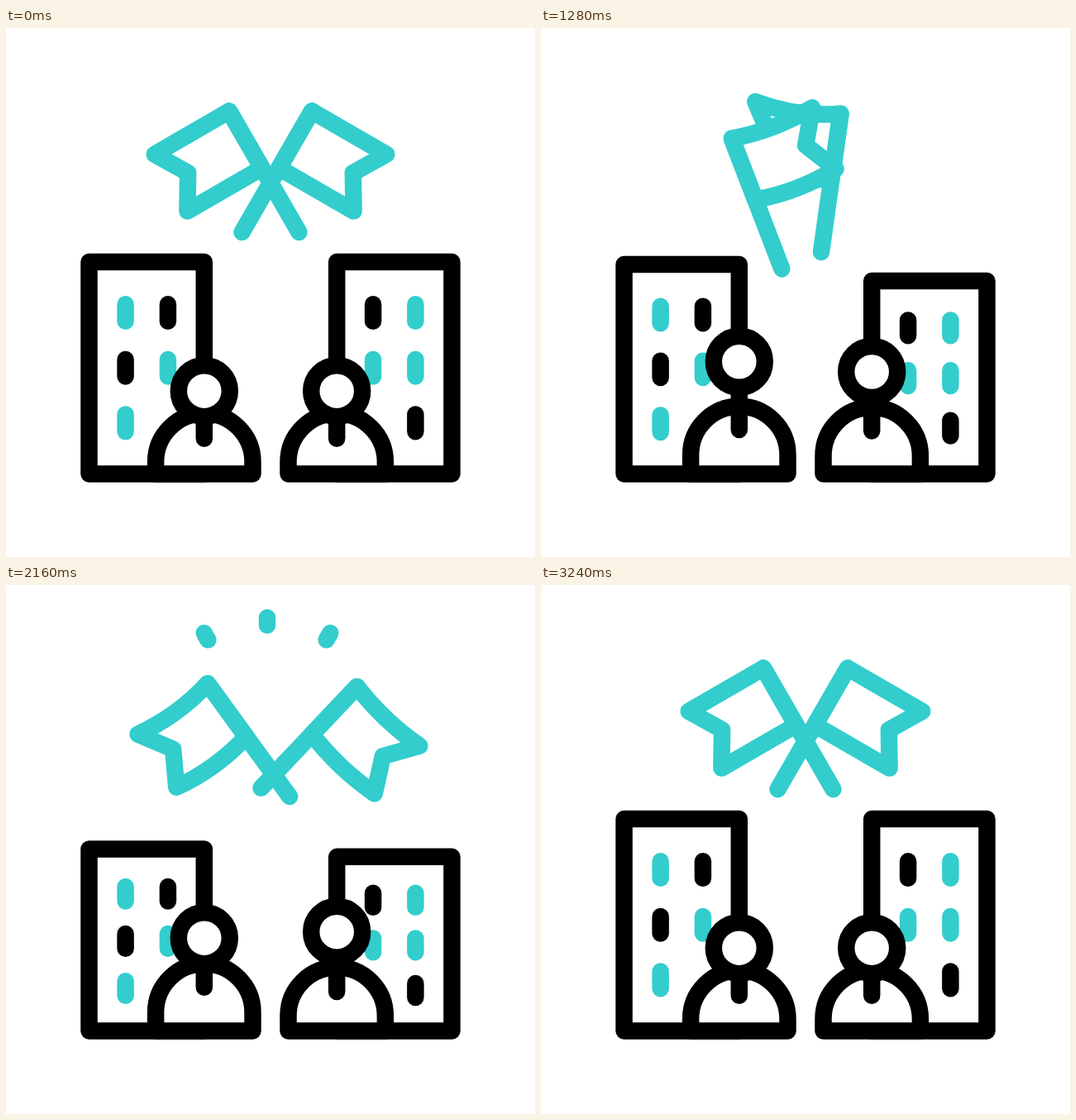
Animation, 640 px wide and 640 px high, one loop 3600 ms. Source, as an HTML page with a canvas:

```html
<!DOCTYPE html>
<html lang="en">
<head>
<meta charset="utf-8">
<title>Two sides</title>
<style>
  html, body { margin: 0; width: 100%; height: 100%; overflow: hidden; background: #fff; }
  canvas { display: block; width: 100vw; height: 100vh; }
</style>
</head>
<body>
<canvas id="stage" width="640" height="640"></canvas>
<script>
const ctx = document.getElementById('stage').getContext('2d');
const TEAL = '#33cdcd', BLACK = '#000', WHITE = '#fff';
const LOOP = 3600, STEP = 20, LAG = 200;
const PANE = 10.3, POLE = 169, CLOTH = 79.4;

const clamp = (v, a, b) => Math.min(b, Math.max(a, v));
const progress = (t, from, to) => clamp((t - from) / (to - from), 0, 1);

// eased path through [time, value] turning points, at rest where it turns
function track(...keys) {
  const last = keys.length - 1;
  const slope = k => {
    if (k === 0 || k === last) return 0;
    const [[t0, v0], [, v], [t1, v1]] = keys.slice(k - 1, k + 2);
    return (v - v0) * (v1 - v) > 0 ? (v1 - v0) / (t1 - t0) : 0;
  };
  return t => {
    let i = 0;
    while (i < last - 1 && t >= keys[i + 1][0]) i++;
    const [t0, a] = keys[i], [t1, b] = keys[i + 1];
    const u = progress(t, t0, t1), w = 1 - u;
    return a + (b - a) * u * u * (3 - 2 * u) +
      (t1 - t0) * u * w * (slope(i) * w - slope(i + 1) * u);
  };
}

const lean = track([0, 30], [860, -26], [1280, -8], [1440, 23], [1900, 44], [2620, 17], [3040, 30]);
const footX = track([840, 354.5], [1280, 339], [1580, 318], [2500, 354.5], [3040, 353.5]);
const footY = track([0, 247], [760, 310], [1280, 271], [1560, 230], [2340, 260], [3040, 247]);
const bulge = track([0, 0], [760, 11], [1190, -8], [1620, 9], [2060, -6], [2680, 6], [3040, 0]);
const headShift = track([200, 0], [540, 13], [1240, -34], [1540, -34.5], [2250, -11], [2500, -18], [2780, 0]);
const bodyShift = track([200, 0], [520, 12], [1200, -11], [1880, -3.5], [2180, -10], [2580, 0]);

function line(x1, y1, x2, y2, color) {
  ctx.strokeStyle = color;
  ctx.beginPath();
  ctx.moveTo(x1, y1);
  ctx.lineTo(x2, y2);
  ctx.stroke();
}

function outline(color) {
  ctx.fillStyle = WHITE;
  ctx.strokeStyle = color;
  ctx.fill();
  ctx.stroke();
}

function building(t, mirrored) {
  const turns = 2 * progress(t, 180, 2580);
  const drop = 23 * (1 - Math.cos(turns * 2 * Math.PI));
  ctx.beginPath();
  ctx.rect(100.5, 283 + drop, 139.3, 256.5 - drop);
  outline(BLACK);

  const sink = y => y + drop * 0.00393 * (548 - y);
  const pane = (col, row, color) => {
    const x = 144.6 + 51.3 * col, y = 344.5 + 66.7 * row;
    line(x, sink(y - PANE), x, sink(y + PANE), color);
  };
  pane(0, 0, TEAL);
  pane(0, 1, mirrored ? TEAL : BLACK);
  pane(0, 2, mirrored ? BLACK : TEAL);
  pane(1, 0, BLACK);
  pane(1, 1, TEAL);
}

function person(t) {
  const body = bodyShift(t);
  const x = 239.8, r = 58.7, floor = 539.5, y = 525 + 0.8 * body;
  ctx.beginPath();
  ctx.moveTo(x - r, floor);
  ctx.arc(x, y, r, Math.PI, 0);
  ctx.lineTo(x + r, floor);
  ctx.closePath();
  outline(BLACK);
  line(x, y - r, x, 496.7 + body, BLACK);
  ctx.beginPath();
  ctx.arc(x, 439.2 + headShift(t), 31, 0, 2 * Math.PI);
  outline(BLACK);
}

function flag(t) {
  const bend = -2 * bulge(t);
  ctx.save();
  ctx.translate(footX(t), footY(t));
  ctx.rotate(-lean(t) * Math.PI / 180);
  ctx.translate(0, -POLE);
  ctx.beginPath();
  ctx.moveTo(0, 0);
  ctx.quadraticCurveTo(-52, bend, -104.3, 0);
  ctx.lineTo(-80.5, CLOTH / 2);
  ctx.lineTo(-104.3, CLOTH);
  ctx.quadraticCurveTo(-52, CLOTH + bend, 0, CLOTH);
  ctx.closePath();
  outline(TEAL);
  line(0, 0, 0, POLE, TEAL);
  ctx.restore();
}

function rays(t) {
  const tip = progress(t, 1900, 2100), tail = progress(t, 2000, 2240);
  if (tip <= 0 || tail >= 1) return;
  const far = 28 * (1 - tip), near = 28 * (1 - tail);
  for (const side of [-1, 0, 1]) {
    const x = 316 + 76.3 * side, y = 39.5 + 18.7 * Math.abs(side);
    const dx = -0.5 * side, dy = Math.sqrt(1 - dx * dx);
    line(x + dx * far, y + dy * far, x + dx * near, y + dy * near, TEAL);
  }
}

// the right side is the left one mirrored and a little later
function both(draw, t) {
  draw(t, false);
  ctx.save();
  ctx.translate(640, 0);
  ctx.scale(-1, 1);
  draw(t - LAG, true);
  ctx.restore();
}

function render(t) {
  ctx.fillStyle = WHITE;
  ctx.fillRect(0, 0, 640, 640);
  ctx.lineWidth = 20.5;
  ctx.lineCap = ctx.lineJoin = 'round';
  both(building, t);
  both(person, t);
  both(flag, t);
  rays(t);
}

const start = performance.now();
function tick(now) {
  const t = Math.max(0, now - start) % LOOP;
  render(Math.floor(t / STEP) * STEP);
  requestAnimationFrame(tick);
}
render(0);
requestAnimationFrame(tick);
</script>
</body>
</html>
```
